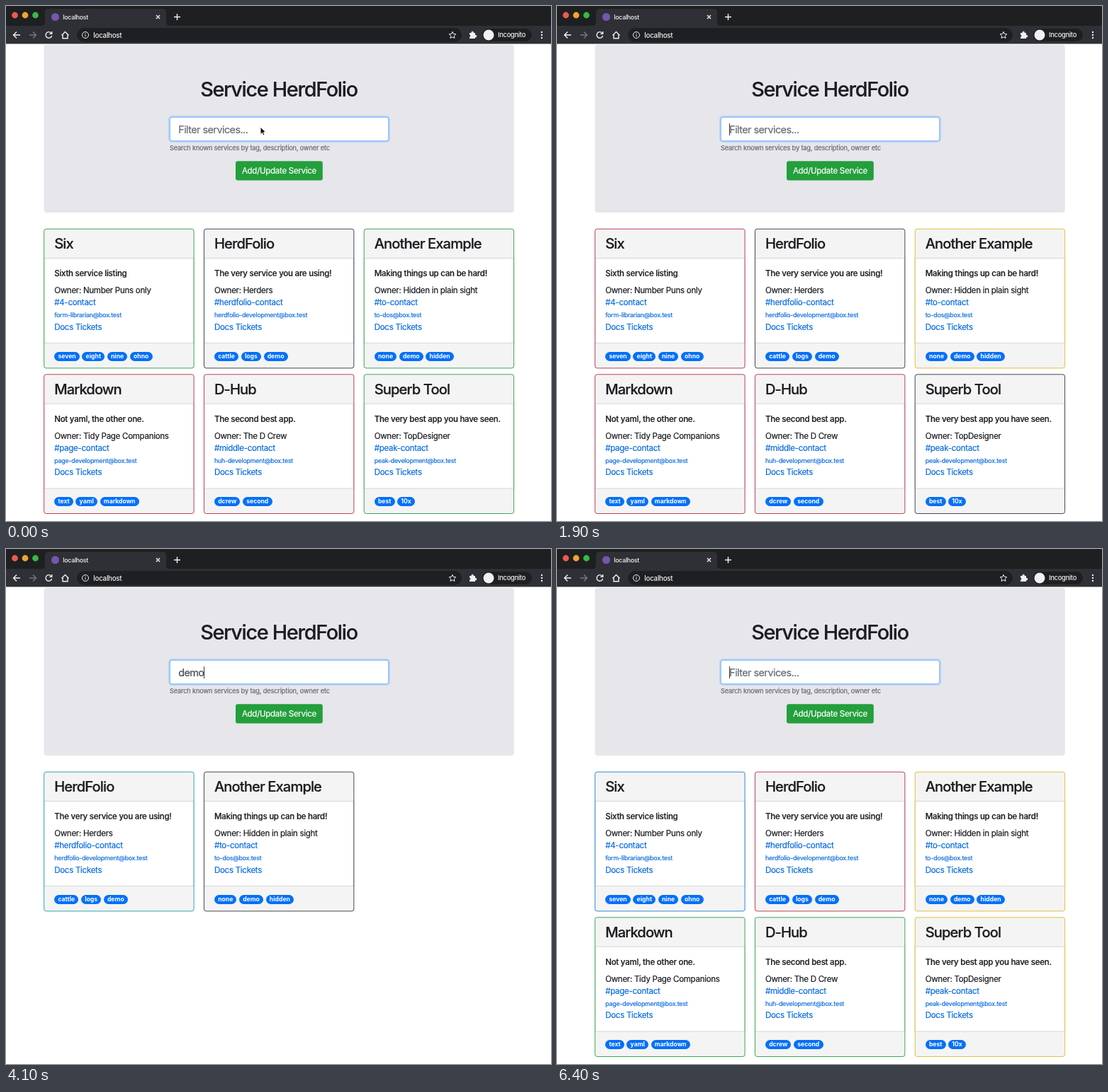
An HTML page for the animation above (6.6 s loop, 769 px wide and 728 px high).

```html
<!DOCTYPE html>
<html lang="en">
<head>
<meta charset="utf-8">
<title>Service HerdFolio</title>
<style>
  html, body { margin: 0; width: 100%; height: 100%; overflow: hidden; background: #fff; }
  body { position: relative; font: 11.52px/20px Inter, Arial, sans-serif; color: #1b1c20; letter-spacing: -.024em;
         -webkit-text-stroke: .018em; }
  body *, svg { position: absolute; box-sizing: border-box; white-space: nowrap; }
  svg { left: 0; top: 0; }
  #stage { left: 0; top: 0; width: 769px; height: 728px; overflow: hidden; background: #fff; }
  .bar text { fill: #f1f1f3; font-weight: 500; -webkit-text-stroke: 0; }
  h1 { left: 0; top: 103px; width: 770px; margin: 0; text-align: center; font-size: 28.8px; line-height: 30px;
       font-weight: 500; letter-spacing: -.046em; }
  #field { left: 243.2px; top: 158px; color: #45494f; font-size: 14.4px; line-height: 34px; letter-spacing: -.038em; }
  #field.empty { color: #666a72; }
  #field * { position: static; }
  #field i { display: inline-block; width: 1px; height: 17px; margin-right: -1px; vertical-align: -3px; background: #33363b; }
  .help { left: 231px; top: 191px; font-size: 9.2px; color: #666a71; letter-spacing: -.015em; }
  .button { left: 324px; top: 219px; width: 123px; height: 27px; color: #fff; text-align: center; line-height: 28px; }
  #cards { left: 0; top: 0; }
  .card > * { left: 0; }
  .name { font-size: 20.16px; font-weight: 500; letter-spacing: -.045em; }
  .about { font-weight: 500; letter-spacing: -.021em; }
  .link, .mail { color: #0a6ce0; }
  .mail { font-size: 8.8px; letter-spacing: -.02em; }
  .tags { display: flex; gap: 3.5px; }
  .tags b { position: static; padding: 0 5.2px; height: 13px; border-radius: 7px; background: #0470f8; color: #fff;
            font-size: 8.64px; line-height: 13px; letter-spacing: 0; -webkit-text-stroke: 0; }
</style>
</head>
<body>
<div id="stage">
  <svg class="bar" width="769" height="300" fill="none" stroke-width="1.4" stroke="#f1f1f3">
    <g stroke="none">
      <rect x="53.5" y="54.7" width="663.3" height="237.2" rx="4" fill="#e6e6eb"/>
      <path fill="#1e1f21" d="M0 0H769V28H0Z"/>
      <path fill="#2f3035" d="M0 28H769V53.5H0ZM50 28Q55 28 55 23V9Q55 4 60 4H221Q226 4 226 9V23Q226 28 231 28Z"/>
      <circle cx="12.5" cy="13" r="4.4" fill="#ec5a4e"/>
      <circle cx="27" cy="13" r="4.4" fill="#f0a432"/>
      <circle cx="41.5" cy="13" r="4.4" fill="#35b944"/>
      <circle cx="69.5" cy="15.5" r="5.5" fill="#7656b0"/>
      <rect x="100" y="31" width="543" height="20" rx="10" fill="#1e1f22"/>
      <rect x="672" y="32" width="70" height="18" rx="9" fill="#1e1f22"/>
      <circle cx="681" cy="41" r="7.5" fill="#f1f1f3"/>
      <g fill="#f1f1f3">
        <circle cx="756" cy="37" r="1.2"/><circle cx="756" cy="41" r="1.2"/><circle cx="756" cy="45" r="1.2"/>
        <path d="M654 38h2.6a1.7 1.7 0 1 1 3.2 0H662v3a1.7 1.7 0 1 1 0 3.2V46h-8v-2.2a1.7 1.7 0 0 0 0-3.3Z"/>
      </g>
      <text x="80.3" y="18.8" font-size="8.8">localhost</text>
      <text x="123.3" y="44.6" font-size="9.8">localhost</text>
      <text x="694" y="44.4" font-size="9.3">Incognito</text>
      <rect x="229.2" y="155.2" width="312.6" height="37.6" rx="5" fill="#b0d0f6"/>
      <rect x="324" y="219.2" width="122.8" height="27.2" rx="3" fill="#249f3c"/>
    </g>
    <rect x="231.3" y="157.3" width="308.4" height="33.4" rx="3" fill="#fff" stroke="#80b9f9" stroke-width="1"/>
    <path d="M212 13l5 5M217 13l-5 5M237 15.5h9M241.5 11v9"/>
    <path d="M20 41H10.5M15 36.5L10.5 41L15 45.5"/>
    <path stroke="#77787d" d="M33 41h9.5M38 36.5L42.5 41L38 45.5"/>
    <path d="M63.6 38A4.3 4.3 0 1 0 64.6 42M64.7 36v3.3h-3.3"/>
    <path d="M78.5 41.5L83.5 36.5L88.5 41.5M80 40.5V45.8H87V40.5"/>
    <g stroke-width="1"><circle cx="112" cy="41" r="4.5"/><path d="M112 40.3v3M112 38.2v1.1"/>
      <path d="M630 36.3l1.4 3.1 3.4.4-2.5 2.3.7 3.4-3-1.7-3 1.7.7-3.4-2.5-2.3 3.4-.4Z"/></g>
  </svg>
  <h1>Service HerdFolio</h1>
  <div id="field"></div>
  <div class="help">Search known services by tag, description, owner etc</div>
  <div class="button">Add/Update Service</div>
  <svg id="frames" width="769" height="728"></svg>
  <div id="cards"></div>
  <svg id="mouse" style="left:357px;top:169px" width="12" height="17">
    <path d="M2 2V12.5L4.5 10.3L6.2 14L8 13.2L6.4 9.6H9.6Z" fill="#111" stroke="#fff" stroke-width="1"/>
  </svg>
</div>
<script>
  const LOOP = 6600;
  const INK = { G: '#3ea357', K: '#44484d', R: '#bb4154', Y: '#e4bd42', T: '#32a5b6', B: '#3288d6', S: '#77787c' };

  // name, description, owner, channel, mail name, tags
  const SERVICES = [
    ['Six', 'Sixth service listing', 'Number Puns only', '4-contact', 'form-librarian', 'seven eight nine ohno'],
    ['HerdFolio', 'The very service you are using!', 'Herders', 'herdfolio-contact', 'herdfolio-development', 'cattle logs demo'],
    ['Another Example', 'Making things up can be hard!', 'Hidden in plain sight', 'to-contact', 'to-dos', 'none demo hidden'],
    ['Markdown', 'Not yaml, the other one.', 'Tidy Page Companions', 'page-contact', 'page-development', 'text yaml markdown'],
    ['D-Hub', 'The second best app.', 'The D Crew', 'middle-contact', 'huh-development', 'dcrew second'],
    ['Superb Tool', 'The very best app you have seen.', 'TopDesigner', 'peak-contact', 'peak-development', 'best 10x']
  ];

  // start time, typed text, caret shown, visible services, border colours
  const STEPS = [
    [0, '', 0, '012345', 'GKGRRG'],
    [400, '1', 1, '5', 'T'],
    [600, '10', 1, '5', 'G'],
    [900, '10x', 1, '5', 'S'],
    [1400, '10x', 0, '5', 'S'],
    [1600, '10', 1, '5', 'R'],
    [1700, '1', 1, '5', 'K'],
    [1900, '', 1, '012345', 'RKYRRK'],
    [2300, '', 0, '012345', 'RKYRRK'],
    [2500, 'd', 1, '1234', 'GRKB'],
    [2700, 'de', 1, '12', 'YG'],
    [2800, 'dem', 1, '12', 'KR'],
    [2900, 'demo', 1, '12', 'TK'],
    [3500, 'demo', 0, '12', 'TK'],
    [4100, 'demo', 1, '12', 'TK'],
    [4200, 'dem', 1, '12', 'RG'],
    [4400, 'de', 1, '12', 'TT'],
    [4800, 'de', 0, '12', 'TT'],
    [4900, 'd', 1, '1234', 'KGRY'],
    [5100, '', 1, '012345', 'BRYGGY'],
    [5700, '', 0, '012345', 'BRYGGY'],
    [6200, '', 1, '012345', 'BRYGGY']
  ];

  const byId = id => document.getElementById(id);
  const slotX = slot => 53.7 + slot % 3 * 225.75;
  const slotY = slot => 315.2 + Math.floor(slot / 3) * 205.6;
  const line = (mid, cls, text) => `<div class="${cls}" style="top:${mid - 10}px">${text}</div>`;

  function frame(slot, ink) {
    const box = (top, height, look) =>
      `<rect x="${slotX(slot)}" y="${slotY(slot) + top}" width="211.4" height="${height}" ${look}/>`;
    return box(0, 196.7, 'rx="3" fill="#f4f4f4"') +
      box(41.4, 119.8, 'fill="#fff" stroke="#d6d6d6"') +
      box(0, 196.7, `rx="3" fill="none" stroke="${ink}"`);
  }

  function card([name, about, owner, channel, mail, tags], slot) {
    const pills = tags.split(' ').map(tag => `<b>${tag}</b>`).join('');
    return `<div class="card" style="left:${slotX(slot) + 14.5}px;top:${slotY(slot)}px">` +
      line(21.3, 'name', name) +
      line(62.8, 'about', about) +
      line(86.8, '', 'Owner: ' + owner) +
      line(104.1, 'link', '#' + channel) +
      line(121.8, 'mail', mail + '@box.test') +
      line(138.5, 'link', 'Docs Tickets') +
      `<div class="tags" style="top:173.5px">${pills}</div></div>`;
  }

  function show([start, text, caret, visible, inks]) {
    const bar = caret ? '<i></i>' : '';
    byId('field').className = text ? '' : 'empty';
    byId('field').innerHTML = text ? text + bar : bar + 'Filter services...';
    byId('mouse').style.display = start === 0 ? '' : 'none';
    byId('frames').innerHTML = [...inks].map((ink, slot) => frame(slot, INK[ink])).join('');
    byId('cards').innerHTML = [...visible].map((n, slot) => card(SERVICES[n], slot)).join('');
  }

  let current;
  function tick() {
    const time = performance.now() % LOOP;
    const step = STEPS.findLast(s => s[0] <= time);
    if (step !== current) show(current = step);
    requestAnimationFrame(tick);
  }
  tick();
</script>
</body>
</html>
```
